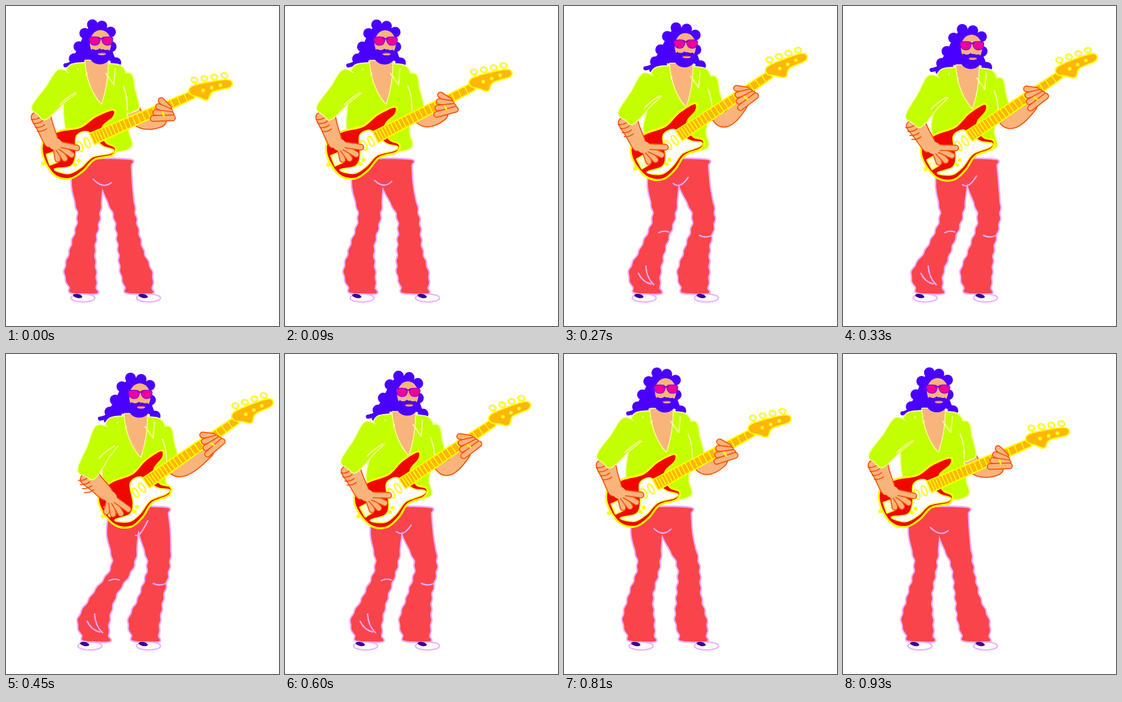
An HTML page with a canvas for the animation above (0.96 s loop, 410 px wide and 480 px high).

```html
<!DOCTYPE html>
<html>
<head>
<meta charset="utf-8">
<title>Guitarist</title>
<style>
html, body { margin: 0; width: 100%; height: 100%; overflow: hidden; background: #fff; }
canvas { display: block; }
</style>
</head>
<body>
<canvas id="stage" width="410" height="480"></canvas>
<script>
const ctx = document.getElementById('stage').getContext('2d');
const LOOP = 960, STEP = 30, RAD = Math.PI / 180;
const SKIN = '#f9b47c', INK = '#ff4a00', HAIR = '#4a00ff', SHIRT = '#c4ff00', PALE = '#f4ff96',
  PANTS = '#fa444c', LILAC = '#eab0ff', YELLOW = '#ffff00', GOLD = '#ffb608', RED = '#f00800';

// Smooth curve through (xs, ys), continued straight past both ends.
function spline(xs, ys, x) {
  const last = xs.length - 1;
  const rise = i => (ys[i + 1] - ys[i]) / (xs[i + 1] - xs[i]);
  const slope = i => {
    if (i === 0) return rise(0);
    if (i === last) return rise(last - 1);
    const before = xs[i] - xs[i - 1], after = xs[i + 1] - xs[i];
    return (rise(i - 1) * after + rise(i) * before) / (before + after);
  };
  if (x <= xs[0]) return ys[0] + slope(0) * (x - xs[0]);
  if (x >= xs[last]) return ys[last] + slope(last) * (x - xs[last]);
  let i = 0;
  while (xs[i + 1] < x) i++;
  const h = xs[i + 1] - xs[i], u = (x - xs[i]) / h, v = 1 - u;
  return ys[i] * (1 + 2 * u) * v * v + ys[i + 1] * (3 - 2 * u) * u * u
    + h * u * v * (v * slope(i) - u * slope(i + 1));
}

// The lean runs from 0 (left) to just past 3 (right) and back.
const leanAt = t => spline(
  [-30, 0, 180, 330, 450, 480, 600, 720, 930, 960],
  [0, 0, 1, 2, 3, 3.15, 1.65, 1, 0, 0], t);
const pose = (lean, ...stops) => spline([0, 1, 2, 3], stops, lean);

function smooth(points) {
  const n = points.length, path = new Path2D();
  path.moveTo(...points[0]);
  for (let i = 0; i < n; i++) {
    const [a, b, c, d] = [-1, 0, 1, 2].map(k => points[(i + k + n) % n]);
    path.bezierCurveTo(b[0] + (c[0] - a[0]) / 6, b[1] + (c[1] - a[1]) / 6,
      c[0] - (d[0] - b[0]) / 6, c[1] - (d[1] - b[1]) / 6, ...c);
  }
  path.closePath();
  return path;
}

function fill(path, color) { ctx.fillStyle = color; ctx.fill(path); }
function stroke(path, color, width) { ctx.strokeStyle = color; ctx.lineWidth = width; ctx.stroke(path); }
function paint(path, color, edge, width) { stroke(path, edge, width); fill(path, color); }

// A straight line, or a curve when a control point comes before the end.
function curve(color, width, x, y, ...rest) {
  const path = new Path2D();
  path.moveTo(x, y);
  rest.length === 4 ? path.quadraticCurveTo(...rest) : path.lineTo(...rest);
  stroke(path, color, width);
}

function outlined(width, ...line) {
  curve(INK, width + 3, ...line);
  curve(SKIN, width, ...line);
}

function oval(x, y, rx, ry, color, edge, width = 2, turn = 0) {
  const path = new Path2D();
  path.ellipse(x, y, rx, ry, turn, 0, 7);
  fill(path, color);
  if (edge) stroke(path, edge, width);
}

// Tapered limb from a to b; ends are blunt.
function limb([ax, ay], [bx, by], startWidth, endWidth) {
  const len = Math.hypot(bx - ax, by - ay), dx = (bx - ax) / len, dy = (by - ay) / len;
  const side = (along, off) => [ax + dx * along - dy * off, ay + dy * along + dx * off];
  const middle = (startWidth + endWidth) / 2 + 1;
  return smooth([side(0, startWidth), side(0, -startWidth), side(len / 2, -middle),
    side(len, -endWidth), side(len + 3, 0), side(len, endWidth), side(len / 2, middle)]);
}

function inFrame([x, y], degrees, draw) {
  ctx.save();
  ctx.translate(x, y);
  ctx.rotate(degrees * RAD);
  draw();
  ctx.restore();
}

// Trouser leg around its centre line, with a slight ripple in the cloth.
function leg(xs) {
  const ys = [230, 268, 318, 364, 406, 430], widths = [25, 23, 16, 18, 23, 18];
  const left = [], right = [];
  for (let y = 230; y <= 430; y += 8) {
    const x = spline(ys, xs, y), w = spline(ys, widths, y);
    const ripple = y > 300 ? Math.sin(y * .4) : 0;
    left.push([x - w - ripple, y]);
    right.unshift([x + w + ripple, y + 1]);
  }
  return smooth([...left, ...right]);
}

function drawLegs(lean) {
  const l = [pose(lean, 122, 130, 163, 175), pose(lean, 124, 133, 162, 175),
    pose(lean, 115, 118, 144, 146), pose(lean, 112, 114, 126, 131)];
  const r = [pose(lean, 166, 176, 210, 223), pose(lean, 179, 196, 219, 229),
    pose(lean, 187, 190, 208, 218), pose(lean, 197, 188, 200, 207)];
  const hip = (l[0] + r[0]) / 2;
  const legs = [leg([hip - 18, ...l, l[3] + 5]), leg([hip + 18, ...r, r[3] + 3])];
  legs.forEach(p => stroke(p, LILAC, 4.5));
  legs.forEach(p => fill(p, PANTS));
  curve(LILAC, 2, hip - 13 + 3 * lean, 260 + 4 * lean, hip + 2, 275, hip + 14, 265 - 5 * lean);
  if (lean > 1.4) {
    const [x, knee] = [l[3], l[2]];
    curve(LILAC, 2, x + 2, 390, x + 3, 408, x + 14, 418);
    curve(LILAC, 2, x - 9, 401, x - 3, 414, x + 10, 417);
    curve(LILAC, 2, knee + 9, 340, knee + 16, 336, knee + 24, 339);
    curve(LILAC, 2, r[2] + 3, 344, r[2] + 13, 349, r[2] + 22, 344);
  }
  for (const x of [54 + l[3] * .55, 214]) {
    oval(x, 438, 18, 6, '#fff', LILAC);
    oval(x - 8, 435, 7, 3, '#3c0090', null, 0, .2);
  }
  return hip;
}

function drawShirt(x, y, hip, cuff) {
  const trunk = smooth([[x - 20, y - 2], [x - 44, y + 7], [x - 49, y + 55], [hip - 52, 190], [hip - 28, 220],
    [hip + 40, 214], [hip + 40, 188], [x + 44, y + 60], [x + 42, y + 9], [x + 18, y - 1]]);
  const sleeve = limb([x + 34, y + 20], cuff, 17, 10);
  [trunk, sleeve].forEach(p => stroke(p, PALE, 4));
  [trunk, sleeve].forEach(p => fill(p, SHIRT));
  curve(PALE, 2, x + 46, y + 68, x + 47, y + 48, x + 40, y + 32);
  paint(new Path2D(`M${x - 17} ${y - 6}Q${x - 14} ${y + 34} ${x + 7} ${y + 58}Q${x + 17} ${y + 30} ${x + 17} ${y - 6}Z`),
    SKIN, PALE, 3);
  for (const side of [-1, 1]) {
    const tip = x + side * 26;
    curve(PALE, 2, x + side * 28, y + 6, tip, y + 30);
    curve(PALE, 2, tip, y + 30, x + side * 14, y + 13);
  }
}

function drawGuitar() {
  ctx.translate(-130, -199);
  paint(smooth([[58, 202], [80, 189], [112, 183], [135, 167], [160, 157], [160, 166], [145, 179], [143, 192],
    [150, 206], [163, 213], [158, 223], [132, 229], [114, 247], [94, 258], [72, 251], [57, 225]]), RED, YELLOW, 6);
  paint(smooth([[106, 196], [122, 189], [133, 200], [146, 211], [161, 216], [155, 221], [130, 226],
    [112, 242], [94, 251], [73, 245], [97, 241], [105, 225]]), '#fff', YELLOW, 3);
  for (const x of [111, 122]) oval(x, 266 - x / 2, 3.5, 8, '#fff', YELLOW, 2, -.4);
  for (const [x, y] of [[104, 238], [109, 232], [56, 236]]) oval(x, y, 2, 2, YELLOW, YELLOW);
  paint(new Path2D('M61 223L73 219L79 233L66 238Z'), '#ffffd0', YELLOW, 3);
  inFrame([130, 199], -23.7, () => {
    paint(new Path2D('M0 -8L164 -5V5L0 8Z'), GOLD, YELLOW, 4);
    for (let x = 4, gap = 4.5; x < 160; x += gap, gap *= 1.05) curve(YELLOW, 1.6, x, -7, x, 7);
  });
  for (let i = 0; i < 4; i++) {
    const x = 283 + 15 * i, y = 111 - 2.2 * i;
    curve(YELLOW, 3, x, y, x + 3, y + 9);
    oval(x, y, 5, 4, '#eef8f0', YELLOW, 2, .3);
  }
  paint(smooth([[277, 131], [280, 121], [315, 113], [336, 112], [336, 121], [310, 128], [302, 140], [290, 136]]),
    GOLD, YELLOW, 4);
  for (const x of [296, 309, 322]) oval(x, 217 - x * .305, 1.8, 1.8, '#fff', YELLOW);
}

function drawPickHand() {
  for (let i = 3; i >= 0; i--) {
    const a = (12 + 23 * i) * RAD, reach = 33 - 3 * i;
    outlined(7, 5, 0, 5 + reach * Math.cos(a), reach * Math.sin(a));
  }
  oval(5, 1, 10, 9, SKIN);
}

function drawFretHand() {
  for (let i = 3; i >= 0; i--) outlined(7, 14 - 2 * i, 11 - 5 * i, -15 + 4 * i, 12 - 9 * i);
  curve(YELLOW, 2.5, -1, 2, 1, 8);
}

// Curls strung over the crown, trailing to the left when leaning.
function drawHair(spread) {
  const crown = [[23, 32], [16, 8], [15, -14], [2, -23], [-14, -25], [-27, -12], [-37, 8], [-45, 26]]
    .map(([x, y]) => [x < 0 ? x * spread : x, y]);
  fill(smooth([...crown, [-14, 29], [10, 28]]), HAIR);
  crown.forEach(([x, y]) => oval(x, y, 8, 8, HAIR));
  curve(HAIR, 5, 20, 26, 22, 36, 27, 37);
  for (let i = 0; i < 4; i++)
    curve(HAIR, 6, -36 * spread, 16, (-44 + 6 * i) * spread, 34, (-60 + 9 * i) * spread, 36 + i % 2 * 3);
}

function drawFace() {
  oval(0, 3, 16, 20, SKIN);
  oval(-1, 21, 16, 13.5, HAIR);
  for (const x of [-7, 8]) oval(x, 7, 7, 6, SKIN);
  oval(2, 8, 4, 4, SKIN);
  oval(2, 19, 6, 1.8, SKIN);
  curve(INK, 1, -3, 18, 7, 18);
  for (const x of [-16, 3])
    paint(smooth([[x, -5], [x + 14, -5], [x + 12, 4], [x + 3, 4]]), '#ee009c', '#8a00d8', 2.5);
  curve('#8a00d8', 2, -3, -4, 4, -4);
}

function draw(t) {
  const lean = leanAt(t);
  const head = [pose(lean, 142, 165, 193, 201), pose(lean, 53, 54, 60, 61)];
  const neck = [pose(lean, 130, 150, 190, 211), pose(lean, 199, 193, 195, 193)];
  const tilt = pose(lean, 0, -8.8, -10.3, -11);
  const onGuitar = (x, y, turn = tilt) => {
    const c = Math.cos(turn * RAD), s = Math.sin(turn * RAD);
    return [neck[0] + x * c - y * s, neck[1] + x * s + y * c];
  };
  const x = head[0] - 6, y = head[1] + 35, bend = 1.3 * lean * lean;
  const elbow = [x - 86 + bend, y + 72 + bend], wrist = onGuitar(-61, 7);
  const cuff = [x + 54, y + 67], fret = onGuitar(114, 4, tilt - 23.7);

  ctx.clearRect(0, 0, 410, 480);
  ctx.lineCap = ctx.lineJoin = 'round';
  const hip = drawLegs(lean);
  outlined(20.5, ...cuff, cuff[0] + 9, cuff[1] + 27, fret[0] - 6, fret[1] + 14);
  inFrame(head, 0, () => drawHair(.88 + .12 * Math.min(1, lean)));
  drawShirt(x, y, hip, cuff);
  inFrame(neck, tilt, drawGuitar);

  paint(limb(elbow, wrist, 12, 9), SKIN, INK, 3);
  for (let i = 0; i < 4; i++) {
    const px = elbow[0] - 12 + 3 * i, py = elbow[1] + 10 + 6 * i;
    curve(INK, 1.5, px, py, px + 8, py + 1, px + 14, py - 4);
  }
  inFrame(wrist, tilt + 35 * Math.max(0, lean - 2), drawPickHand);
  paint(limb([x - 40, y + 20], elbow, 19, 14), SHIRT, PALE, 3);
  oval(x - 31, y + 25, 17, 17, SHIRT);
  curve(PALE, 2, x - 55, y + 60, x - 46, y + 50, x - 32, y + 42);
  inFrame(fret, tilt * 3.5, drawFretHand);
  inFrame(head, 0, drawFace);
}

function tick() {
  draw(Math.floor(performance.now() % LOOP / STEP) * STEP);
  requestAnimationFrame(tick);
}
tick();
</script>
</body>
</html>
```
